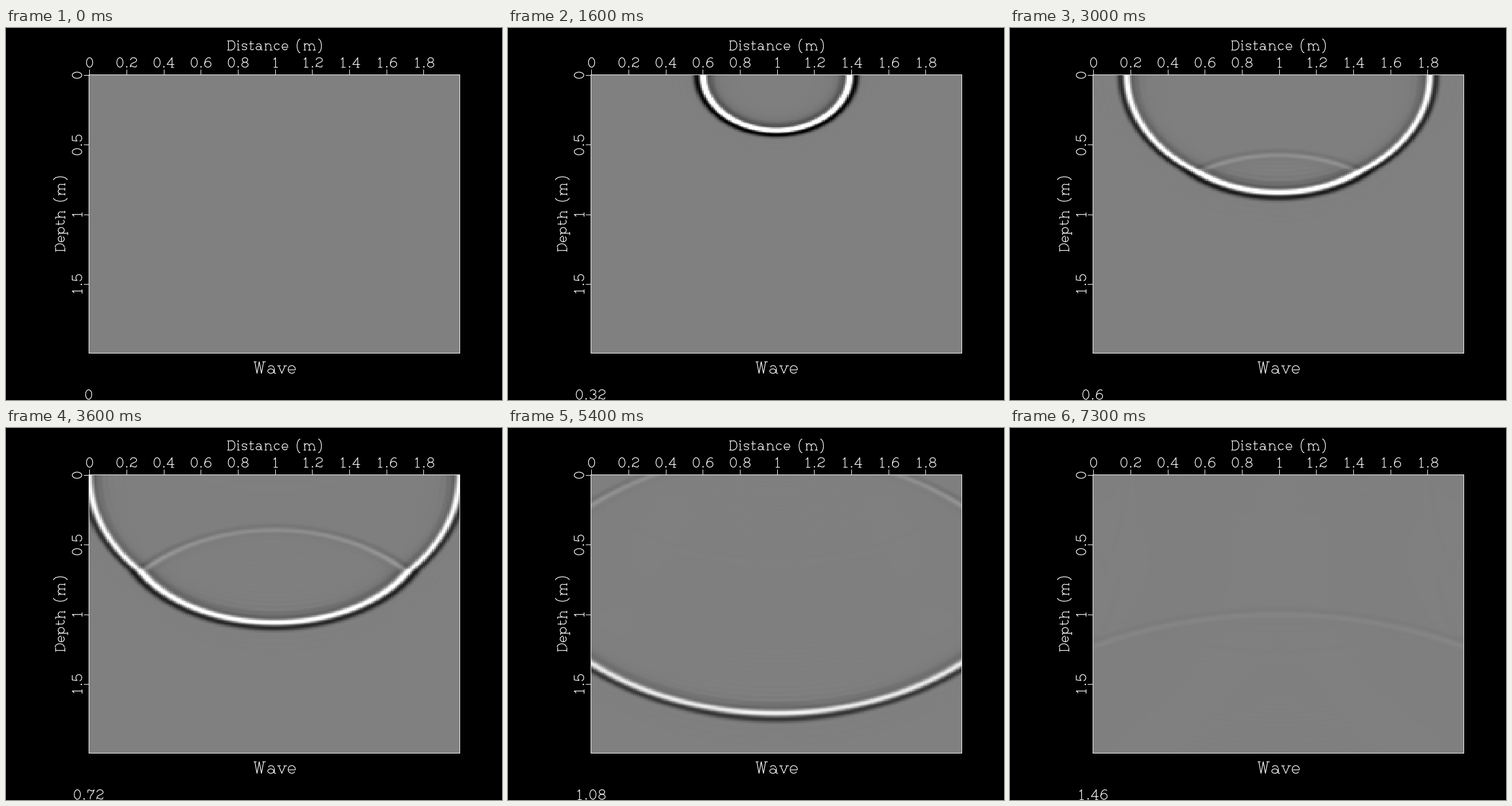
Animation, 864 px wide and 648 px high, one loop 7400 ms. Source, as a matplotlib script:

```python
import numpy as np
import matplotlib.pyplot as plt
from matplotlib.animation import FuncAnimation
from matplotlib.collections import LineCollection

W, H, DPI = 864, 648, 100
PX = 72 / DPI                                # one pixel in points
FRAMES, INTERVAL = 74, 100
LEFT, RIGHT, TOP, BOTTOM = 144, 791, 81, 567

# ---------------------------------------------------------------- wave field
N, PAD, STEP = 200, 50, 0.01                 # cells per side, sponge cells, metres
DT, SKIP = 0.001, 20                         # seconds, steps per frame
FREQ, DELAY = 20.0, 0.052
WEIGHTS = np.float32([8 / 5, -1 / 5, 8 / 315, -1 / 560])
CENTRE = np.float32(-205 / 36)


def ricker(t):
    a = (np.pi * FREQ * (t - DELAY)) ** 2
    return (1 - 2 * a) * np.exp(-a)


def laplacian(f):
    """Eighth-order second differences on the inner cells."""
    m = len(f)
    mid = slice(4, m - 4)
    out = CENTRE * f[mid, mid]
    for d, w in enumerate(WEIGHTS, 1):
        back, fore = slice(4 - d, m - 4 - d), slice(4 + d, m - 4 + d)
        out += w * (f[back, mid] + f[fore, mid] + f[mid, back] + f[mid, fore])
    return out


def simulate():
    """Acoustic waves in three flat layers, absorbed at every edge."""
    size = N + 2 * PAD
    depth = np.arange(size) - PAD
    speed = np.select([depth < 70, depth < 170], [1.5, 1.8], 2.0)
    k = ((speed * DT / STEP) ** 2)[4:-4, None].astype(np.float32)

    outside = np.maximum(0, np.maximum(-depth, depth - N + 1))
    edge = np.exp(-(0.0036 * outside) ** 2)
    damp = np.outer(edge, edge).astype(np.float32)

    old = np.zeros((size, size), np.float32)
    now = np.zeros_like(old)
    view = slice(PAD, PAD + N)
    shots = [now[view, view].copy()]
    for n in range(1, (FRAMES - 1) * SKIP + 1):
        new = 2 * now - old
        new[4:-4, 4:-4] += k * laplacian(now)
        new[PAD, PAD + 99:PAD + 101] += ricker(n * DT)
        old, now = now * damp, new * damp
        if n % SKIP == 0:
            shots.append(now[view, view].copy())
    shots = np.array(shots)
    return shots * (0.91 / shots[54].max())


# ---------------------------------------------------------------- stroke font
def ln(*xy):
    return np.array(xy, float).reshape(-1, 2)


def arc(cx, cy, rx, ry, a, b):
    t = np.radians(np.linspace(a, b, 25))
    return np.column_stack([cx + rx * np.cos(t), cy + ry * np.sin(t)])


def oval(cx, cy, rx, ry):
    return arc(cx, cy, rx, ry, 0, 360)


def foot(x, y=0):
    return ln(x - 3, y, x + 3, y)


# Each glyph: advance width, then strokes centred on x = 0 with baseline y = 0.
GLYPHS = {" ": (16,)}


def glyph(char, width, *strokes):
    GLYPHS[char] = (width, *strokes)


glyph("0", 20, oval(0, 10.5, 6.8, 10.5))
glyph("1", 20, ln(-4, 17, -2, 18, 0.5, 21, 0.5, 0), ln(-4, 0, 5, 0))
glyph("2", 20, arc(0, 15.5, 6.8, 5.5, 180, -25),
      ln(6.2, 13.2, 3, 11, -2, 9, -5, 7, -6.8, 3.5, -7, 0),
      ln(-7, 2, -5, 3, 1, 0.5, 5, 0.5, 7, 4))
glyph("3", 20, arc(0, 16, 6.3, 5, 165, -90), arc(0, 5.5, 7, 5.5, 90, -165))
glyph("4", 20, ln(3, 0, 3, 21, -8, 6, 8, 6), foot(3))
glyph("5", 20, ln(5.5, 21, -5, 21, -6.5, 10.3), arc(-0.2, 6.5, 7, 6.5, 148, -165))
glyph("6", 20, oval(0, 6.5, 7, 6.5), arc(2, 6.5, 9, 14.5, 180, 60))
glyph("7", 20, ln(-7, 15, -7, 21), ln(-7, 19, -4, 21, 1, 18.5, 5, 18.5, 7, 21),
      ln(7, 21, 5, 15, 0, 8, -1.5, 4, -1.5, 0))
glyph("8", 20, oval(0, 16, 6, 5), oval(0, 5.5, 7, 5.5))
glyph("9", 20, oval(0, 14.5, 7, 6.5), arc(-2, 14.5, 9, 14.5, 0, -120))
glyph(".", 10, oval(0, 0.9, 0.8, 0.8))
glyph("(", 14, arc(4, 9, 8, 16, 95, 265))
glyph(")", 14, arc(-4, 9, 8, 16, 85, -85))
glyph("D", 22, ln(-6, 0, -6, 21), ln(-9, 21, 1, 21), ln(-9, 0, 1, 0),
      arc(1, 10.5, 8, 10.5, 90, -90))
glyph("W", 24, ln(-8, 21, -4, 0, 0, 21, 4, 0, 8, 21), foot(-8, 21), foot(8, 21))
glyph("a", 20, arc(-0.5, 10, 5, 4, 165, 0), ln(4.5, 10, 4.5, 3),
      arc(7, 3, 2.5, 3, 180, 300), oval(-1, 4, 5.5, 4))
glyph("c", 18, arc(0, 7, 6.5, 7, 35, 325))
glyph("e", 18, arc(0, 7, 6.5, 7, 0, 325), ln(-6.5, 7, 6.5, 7))
glyph("h", 23, ln(-9, 21, -6, 21, -6, 0), arc(0, 8, 6, 6, 180, 0), ln(6, 8, 6, 0),
      foot(-6), foot(6))
glyph("i", 11, ln(-3, 14, 0, 14, 0, 0), foot(0), oval(0, 20, 0.8, 0.8))
glyph("m", 34, ln(-14, 14, -11, 14, -11, 0), arc(-5.5, 8, 5.5, 6, 180, 0),
      arc(5.5, 8, 5.5, 6, 180, 0), ln(0, 8, 0, 0), ln(11, 8, 11, 0),
      foot(-11), foot(0), foot(11))
glyph("n", 23, ln(-9, 14, -6, 14, -6, 0), arc(0, 8, 6, 6, 180, 0), ln(6, 8, 6, 0),
      foot(-6), foot(6))
glyph("p", 21, ln(-9, 14, -6, 14, -6, -7), foot(-6, -7), oval(0.5, 7, 6.5, 7))
glyph("s", 17, arc(0, 10.5, 5, 3.5, 20, 270), arc(0, 3.5, 5.5, 3.5, 90, -165),
      ln(5, 14, 5, 10.5))
glyph("t", 15, ln(-2, 21, -2, 3.5), arc(2, 3.5, 4, 3.5, 180, 340), ln(-5, 14, 5, 14))
glyph("v", 18, ln(-6, 14, 0, 0, 6, 14), foot(-6, 14), foot(6, 14))


def write(text, x, y, scale, upright=False):
    """Strokes of text centred on (x, y); upright text reads bottom to top."""
    pen = -sum(GLYPHS[c][0] for c in text) / 2
    out = []
    for c in text:
        width, *strokes = GLYPHS[c]
        for s in strokes:
            u = scale * (s[:, 0] + pen + width / 2)
            v = scale * s[:, 1]
            px, py = (x - v, y - u) if upright else (x + u, y - v)
            out.append(np.column_stack([px, py]))
        pen += width
    return out


# ---------------------------------------------------------------- stage
fig = plt.figure(figsize=(W / DPI, H / DPI), dpi=DPI, facecolor="black")
ax = fig.add_axes([0, 0, 1, 1])
ax.axis("off")

shots = simulate()
image = ax.imshow(shots[0], cmap="gray", vmin=-1, vmax=1, interpolation="nearest",
                  aspect="auto", extent=(LEFT, RIGHT, BOTTOM, TOP))

LABEL, AXIS, TITLE = 0.79, 0.757, 0.96
words = write("Distance (m)", 467.7, 38, AXIS)
words += write("Depth (m)", 101.5, 324, AXIS, True)
words += write("Wave", 468, 601.5, TITLE)

# Rules run through pixel centres so that they stay one pixel wide.
x0, x1, y0, y1 = LEFT + 0.5, RIGHT - 0.5, TOP + 0.5, BOTTOM - 0.5
rules = [ln(x0, y0, x1, y0, x1, y1, x0, y1, x0, y0)]
cell_w, cell_h = (RIGHT - LEFT) / N, (BOTTOM - TOP) / N
for i in range(10):
    x = LEFT + cell_w * (20 * i + 0.5)
    mark = int(x) + 0.5
    rules.append(ln(mark, 73, mark, y0))
    words += write(f"{i / 5:g}", x, 68.3, LABEL)
for i in range(4):
    y = TOP + cell_h * (50 * i + 0.5)
    mark = int(y) + 0.5
    rules.append(ln(136, mark, x0, mark))
    words += write(f"{i / 2:g}", 132, y, LABEL, True)

for r in rules:
    ax.plot(r[:, 0], r[:, 1], color="white", lw=PX, snap=False)
ax.add_collection(LineCollection(words, colors="white", linewidths=1.25 * PX))
clock = LineCollection([], colors="white", linewidths=1.25 * PX)
ax.add_collection(clock)
ax.set_xlim(0, W)
ax.set_ylim(H, 0)


def draw(i):
    image.set_data(shots[i])
    clock.set_segments(write(f"{i * SKIP * DT:.4g}", 144, 646.7, LABEL))
    return image, clock


anim = FuncAnimation(fig, draw, frames=FRAMES, init_func=lambda: draw(0),
                     interval=INTERVAL, repeat=True, repeat_delay=0)
plt.show()
```
